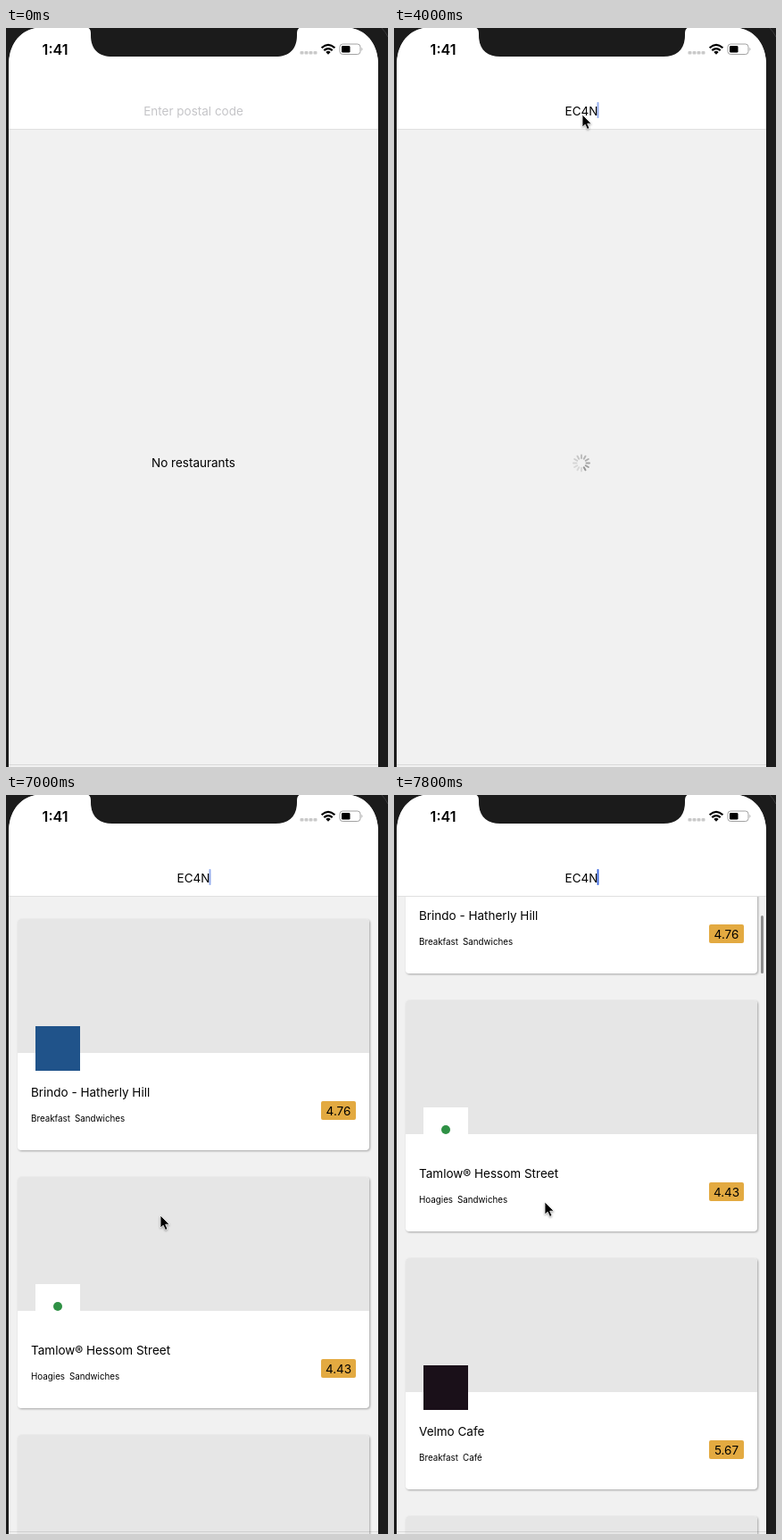
An HTML page that plays this animation: 428 px wide and 828 px high, repeating every 8 s.

```html
<!DOCTYPE html>
<html lang="en">
<head>
<meta charset="utf-8">
<title>Restaurant search</title>
<style>
  html, body { margin: 0; width: 100%; height: 100%; overflow: hidden; background: #1b1b1b; }
  svg { display: block; width: 428px; height: 828px; }
  text { font: 13.5px Inter, sans-serif; fill: #000; white-space: pre; }
  .mid { text-anchor: middle; }
  .tags { font-size: 9.8px; }
  .time { font-size: 16px; font-weight: 600; }
  .hint { fill: #c5c5c8; }
  .card { fill: #fff; filter: drop-shadow(1px 1px 1px rgba(0, 0, 0, .32)); }
  .pointer { filter: drop-shadow(0 1px 1px rgba(0, 0, 0, .35)); }
</style>
</head>
<body>
<svg viewBox="0 0 428 828">
  <defs>
    <clipPath id="screen"><path d="M3 828V42C3 16 18 -1 43 -1H377C402 -1 417 16 417 42V828Z"/></clipPath>
    <clipPath id="body"><rect x="3" y="114" width="414" height="714"/></clipPath>
  </defs>
  <rect width="428" height="828" fill="#1b1b1b"/>
  <path d="M421 0Q425 4 428 10" fill="none" stroke="#3a3a3c"/>
  <g clip-path="url(#screen)">
    <rect width="428" height="828" fill="#f1f1f1"/>
    <rect width="428" height="113" fill="#fff"/>
    <rect y="113" width="428" height="1" fill="#e0e0e0"/>
    <text id="empty" class="mid" x="210" y="492">No restaurants</text>
    <g id="spinner" transform="translate(210 487.5)" stroke-width="2" stroke-linecap="round"></g>
    <g clip-path="url(#body)"><g id="list"></g></g>
    <rect id="bar" x="411" width="3" height="65" rx="1.5" fill="#8e8e8e"/>
    <rect y="825" width="428" height="1" fill="#000" opacity=".1"/>
    <text id="query" class="mid" x="210" y="97.5"></text>
    <rect id="caret" y="83" width="2" height="18" rx=".8" fill="#3f6ae0"/>
    <text class="mid time" x="55" y="29.5">1:41</text>
    <g fill="#c9c9c9">
      <rect x="329.5" y="26" width="4" height="3.6" rx="1"/>
      <rect x="334.5" y="26" width="4" height="3.6" rx="1"/>
      <rect x="339.5" y="26" width="4" height="3.6" rx="1"/>
      <rect x="344.5" y="26" width="4" height="3.6" rx="1"/>
    </g>
    <g fill="none" stroke="#000" stroke-width="2.2">
      <path d="M353.6 22.3Q361 15.6 368.4 22.3"/>
      <path d="M356.3 25.1Q361 21 365.7 25.1"/>
    </g>
    <path d="M358.3 27Q361 24.6 363.7 27L361 29.8Z"/>
    <rect x="374" y="18" width="23" height="11.5" rx="3.2" fill="none" stroke="#a2a2a2"/>
    <rect x="376" y="20" width="9.5" height="7.6" rx="1.4"/>
    <path d="M398.5 21.8Q400.4 23.8 398.5 25.8Z" fill="#a2a2a2"/>
  </g>
  <path d="M90 -1Q95 0 95 6V8C95 24 104 32 119 32H302C317 32 326 24 326 8V6Q326 0 331 -1Z" fill="#1b1b1b"/>
  <path id="pointer" class="pointer" d="M0 0V14L3.2 11.2L5.6 16.4L8 15.3L5.7 10.2H10.2Z" stroke="#fff" stroke-width=".8"/>
</svg>
<script>
const LOOP = 8000;
const $ = id => document.getElementById(id);

// Each step overrides part of the state before it.
const steps = [
  [0, { query: '', caretX: 151, caret: 0, view: 'empty', second: 0, scroll: 0, bar: null, pointer: null }],
  [300, { pointer: [239, 75] }],
  [500, { pointer: [212, 94] }],
  [800, { pointer: [211, 97], caret: 1 }],
  [1000, { caret: 0 }],
  [1500, { caret: .3 }],
  [1800, { caret: 1 }],
  [2000, { query: 'E', caretX: 213.5 }],
  [2300, { query: 'EC', caretX: 218.2 }],
  [2800, { query: 'EC4', caretX: 222.8, view: 'spinner' }],
  [3300, { query: 'EC4N', caretX: 227.5, view: 'empty' }],
  [3500, { view: 'spinner', caret: 'blink' }],
  [5500, { view: 'list' }],
  [6000, { second: 1 }],
  [6300, { pointer: [353, 629] }],
  [6500, { pointer: [180, 468] }],
  [6800, { pointer: [174, 471] }],
  [7000, { pointer: [173, 471] }],
  [7300, { pointer: [173, 359], scroll: 94.5, bar: 126 }],
  [7500, { pointer: [173, 256], scroll: 198, bar: 135 }],
  [7800, { pointer: [169, 456] }]
];
const blink = { 0: .55, 300: 0, 500: .3, 800: 1 };

const square = (y, h, fill) => `<rect x="33" y="${y}" width="50" height="${h}" fill="${fill}"/>`;
const logos = {
  blue: square(120, 50, '#20538a'),
  striped: square(120, 50, '#000') + square(134, 23, '#fff') + '<circle cx="50.5" cy="142" r="5" fill="#6b3a22"/>',
  green: square(120, 50, '#fff') + '<circle cx="58" cy="145" r="5" fill="#2f9145"/>',
  dark: square(120, 50, '#1a1019')
};

function card(slot, logo = '', title = '', tags = ['', ''], score = '') {
  const badge = score && `<rect x="353" y="204" width="39" height="21" rx="2" fill="#e3aa41"/>
    <text class="mid" x="372.5" y="219.5">${score}</text>`;
  return `<g transform="translate(0 ${139 + slot * 289})">
    <rect class="card" x="13" width="394" height="259" rx="4"/>
    <path d="M13 150V4Q13 0 17 0H403Q407 0 407 4V150Z" fill="#e6e6e6"/>
    ${logos[logo] || ''}
    <text x="28" y="198.5">${title}</text>
    <text class="tags" x="28" y="227">${tags[0]}<tspan dx="5">${tags[1]}</tspan></text>
    ${badge}</g>`;
}

$('list').innerHTML =
  card(0, 'blue', 'Brindo - Hatherly Hill', ['Breakfast', 'Sandwiches'], '4.76') +
  `<g id="early">${card(1, 'striped', 'Zib Cafe', ['Breakfast', 'Italian'], '4.47')}</g>` +
  `<g id="late">${card(1, 'green', 'Tamlow® Hessom Street', ['Hoagies', 'Sandwiches'], '4.43')}</g>` +
  card(2, 'dark', 'Velmo Cafe', ['Breakfast', 'Café'], '5.67') +
  card(3);

$('spinner').innerHTML = Array.from({ length: 12 }, (_, i) =>
  `<path d="M0 -5.5V-9" transform="rotate(${i * 30})"/>`).join('');
const spokes = [...$('spinner').children];

const show = (id, on) => $(id).setAttribute('display', on ? 'inline' : 'none');
const move = (id, x, y) => $(id).setAttribute('transform', `translate(${x} ${y})`);

function render(time) {
  const t = time % LOOP;
  const held = Math.floor(t / 500) * 500 + (t % 500 >= 300 ? 300 : 0);
  const s = Object.assign({}, ...steps.filter(([at]) => at <= t).map(([, part]) => part));

  for (const view of ['empty', 'spinner', 'list']) show(view, s.view === view);
  show('early', s.second === 0);
  show('late', s.second === 1);
  show('bar', s.bar !== null);
  show('pointer', s.pointer);
  move('list', 0, -s.scroll);
  if (s.bar !== null) $('bar').setAttribute('y', s.bar);
  if (s.pointer) move('pointer', ...s.pointer);

  $('query').textContent = s.query || 'Enter postal code';
  $('query').classList.toggle('hint', !s.query);
  $('caret').setAttribute('x', s.caretX);
  $('caret').setAttribute('opacity', s.caret === 'blink' ? blink[held % 1000] : s.caret);

  const head = 5 + Math.floor((held % 1000) * 12 / 1000);
  spokes.forEach((spoke, i) => {
    const age = (head - i + 24) % 12;
    const grey = Math.min(216, 150 + age * 8);
    spoke.setAttribute('stroke', `rgb(${grey},${grey},${grey})`);
  });
}

const start = performance.now();
function tick() {
  render(performance.now() - start);
  requestAnimationFrame(tick);
}
tick();
</script>
</body>
</html>
```
